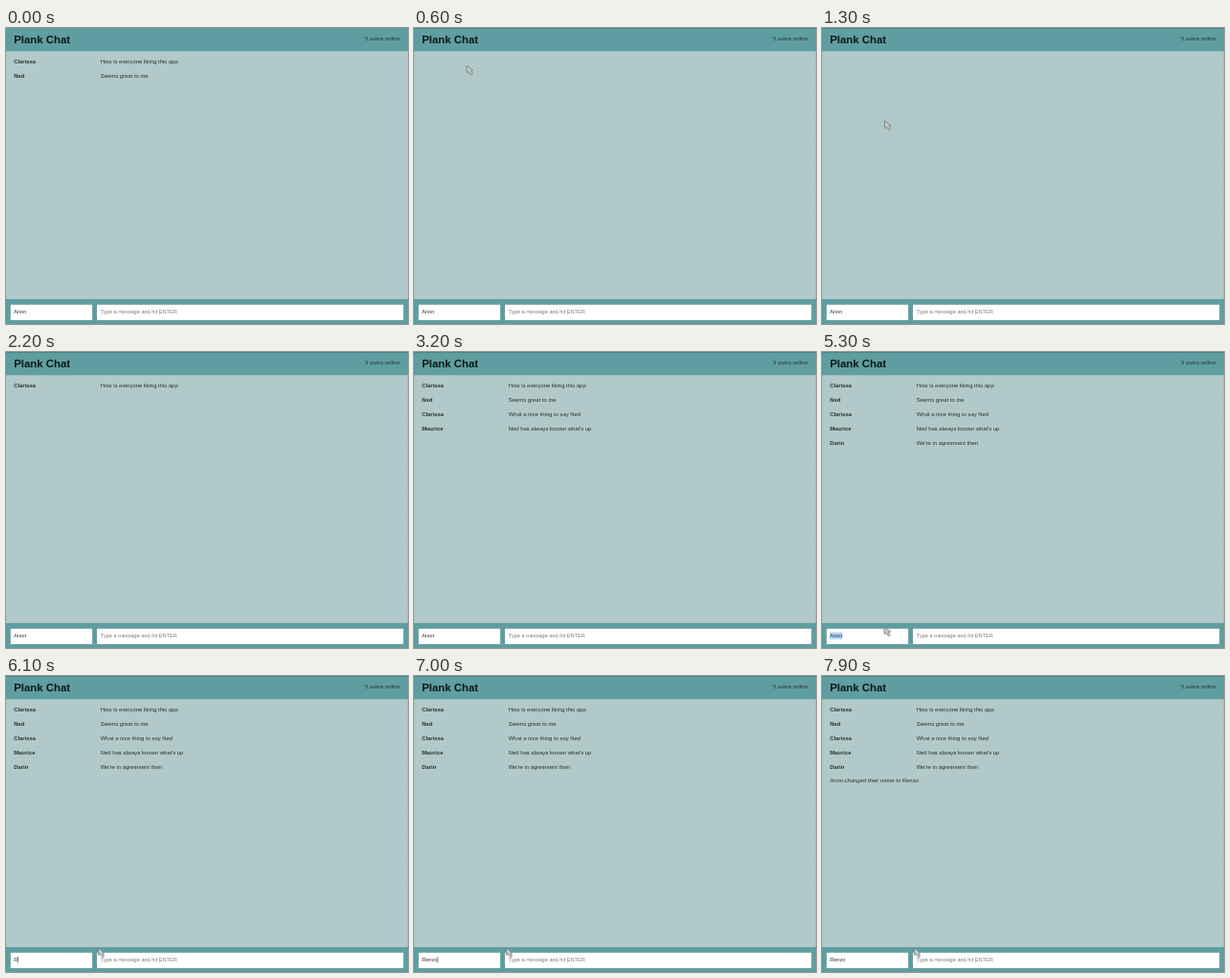
An HTML page for the animation above (8 s loop, 420 px wide and 309 px high).

```html
<!DOCTYPE html>
<html lang="en">
<head>
<meta charset="utf-8">
<title>Chat</title>
<style>
  html, body { margin: 0; width: 100%; height: 100%; overflow: hidden; background: #b1c9c8; }
  svg { display: block; width: 420px; height: 309px; font-family: "Liberation Sans", Arial, sans-serif; }
  text { font-size: 5.9px; fill: #263333; white-space: pre; }
  .title { font-size: 11.4px; font-weight: bold; fill: #0b1717; }
  .name { font-weight: bold; }
  .notice { font-style: italic; }
  .field { font-size: 5.6px; fill: #333; }
  .hint { fill: #7b7b7b; }
</style>
</head>
<body>
<svg viewBox="0 0 420 309">
  <rect width="420" height="309" fill="#b1c9c8"/>
  <rect width="420" height="24" fill="#5f9ea0"/>
  <rect y="24" width="420" height="1" fill="#9dbfbf"/>
  <rect y="283" width="420" height="26" fill="#5f9ea0"/>
  <g id="edge">
    <rect width="420" height="1" fill="#4c8587"/>
    <path d="M419.5 25V283" stroke="#9fb9b7" stroke-dasharray="3 2"/>
  </g>
  <text class="title" x="8.2" y="16">Plank Chat</text>
  <text x="411.8" y="12.8" text-anchor="end">5 users online</text>
  <g id="log"></g>
  <g fill="#fff" stroke="#4f8587" stroke-width=".6">
    <rect x="4.3" y="288.3" width="86.2" height="17"/>
    <rect x="94.7" y="288.3" width="321" height="17"/>
  </g>
  <rect id="mark" x="8" y="292.5" height="7.4" fill="#b4d5fe"/>
  <text id="user" class="field" x="8.2" y="298.3"></text>
  <rect id="caret" y="293" width=".6" height="6.5" fill="#333"/>
  <text class="field hint" x="98.8" y="298.3">Type a message and hit ENTER</text>
  <path id="pointer" d="M0 0L.5 7.6L2.2 6.1L4.4 9.4L6.4 8.4L4.8 5.1L6.9 4.7Z"
        fill="#c3cccb" stroke="#68706f" stroke-width=".7" stroke-linejoin="round"/>
</svg>
<script>
const LOOP = 8000, STEP = 100, NEW_NAME = "Renzo";
const CUT = 100, SELECT = 4900, CLEAR = 5800, TYPE = 6000, KEY = 200, SENT = 7300;
const chat = [
  [1900, "Clarissa", "How is everyone liking this app"],
  [2400, "Ned", "Seems great to me"],
  [2700, "Clarissa", "What a nice thing to say Ned"],
  [3000, "Maurice", "Ned has always known what's up"],
  [3700, "Darin", "We're in agreement then"]
];
// Pointer visits: [time, x, y]
const visits = [
  [[300, 48, 2], [1000, 65.2, 97], [1800, 65.2, 97]],
  [[3900, 76, 214], [4500, 48.2, 287], [4800, 7, 293], [5000, 7, 293], [5500, 96.2, 284], [LOOP, 96.2, 284]]
];

const $ = id => document.getElementById(id);
const show = (el, on) => { el.style.display = on ? "" : "none"; };

function addText(parent, x, y, words, cls) {
  const el = document.createElementNS("http://www.w3.org/2000/svg", "text");
  el.setAttribute("x", x);
  el.setAttribute("y", y);
  el.setAttribute("class", cls);
  el.textContent = words;
  parent.append(el);
  return el;
}

const rows = chat.map(([at, name, words], i) => {
  const y = 37.2 + 15.05 * i;
  return { at, parts: [addText($("log"), 8.2, y, name, "name"), addText($("log"), 98.8, y, words, "")] };
});
const notice = addText($("log"), 8.2, 110.7, `Anon changed their name to ${NEW_NAME}`, "notice");

function pointerAt(t) {
  const path = visits.find(v => t >= v[0][0] && t < v[v.length - 1][0]);
  if (!path) return null;
  const i = path.findIndex(p => p[0] > t);
  const [a, b] = [path[i - 1], path[i]];
  const k = (t - a[0]) / (b[0] - a[0]);
  const ease = k * k * (3 - 2 * k);
  return [a[1] + (b[1] - a[1]) * ease, a[2] + (b[2] - a[2]) * ease];
}

function draw(t) {
  show($("edge"), t >= CUT);
  rows.forEach((row, i) => {
    const on = t < CUT ? i < 2 : t >= row.at;
    row.parts.forEach(el => show(el, on));
  });
  show(notice, t >= SENT);

  const typed = Math.max(0, Math.floor((t - TYPE) / KEY) + 1);
  $("user").textContent = t < CLEAR ? "Anon" : NEW_NAME.slice(0, typed);
  const selected = Math.min(1, Math.max(0, (t - SELECT) / 300));
  $("mark").setAttribute("width", 13.4 * selected);
  show($("mark"), t >= SELECT && t < CLEAR);
  show($("caret"), t >= CLEAR && t < SENT);
  $("caret").setAttribute("x", 8.4 + $("user").getComputedTextLength());

  const pos = pointerAt(t);
  show($("pointer"), pos);
  if (pos) $("pointer").setAttribute("transform", `translate(${pos})`);
}

const start = performance.now();
function tick() {
  const t = (performance.now() - start) % LOOP;
  draw(Math.floor(t / STEP) * STEP);
  requestAnimationFrame(tick);
}
tick();
</script>
</body>
</html>
```
